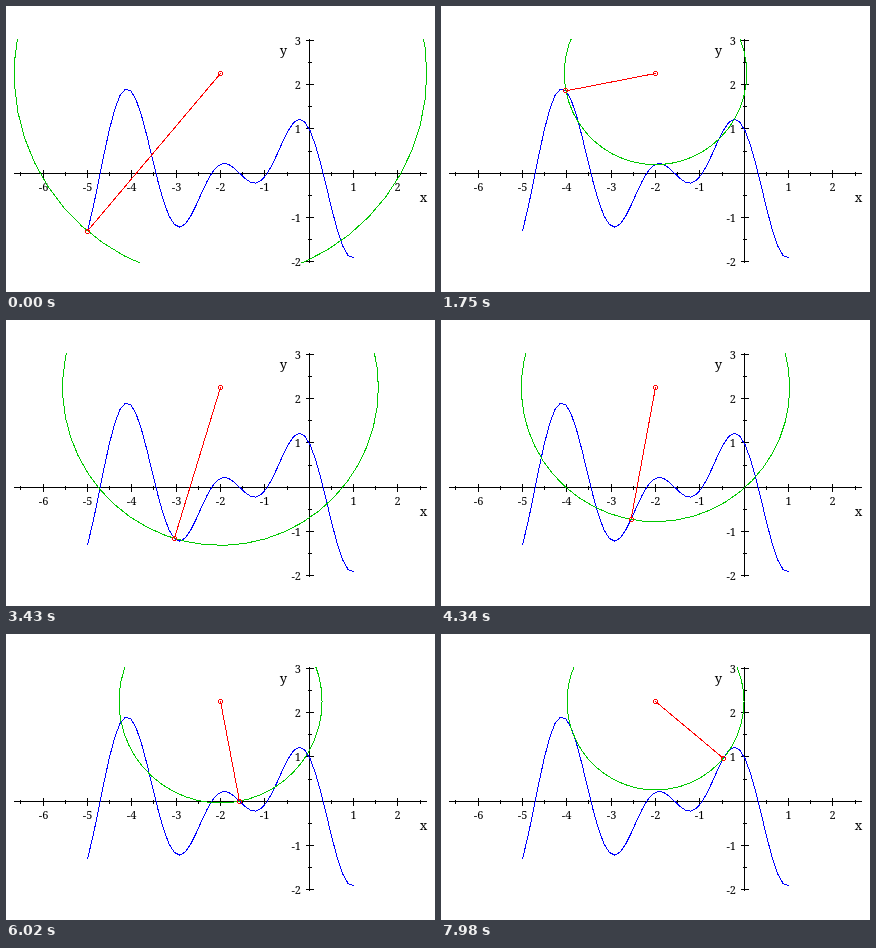
An HTML page that plays this animation: 429x286 px, repeating every 8 s.

```html
<!DOCTYPE html>
<html lang="en">
<head>
<meta charset="utf-8">
<title>Circle through a point moving on a curve</title>
<style>
  html, body { margin: 0; width: 100%; height: 100%; overflow: hidden; background: #fff; }
  svg { display: block; }
  path { fill: none; stroke-width: 1; shape-rendering: crispEdges; }
  text { font: 11px "Noto Serif", "Liberation Serif", serif; fill: #000; }
  .name { font-size: 13px; }
</style>
</head>
<body>
<svg width="429" height="286" viewBox="0 0 429 286">
  <clipPath id="view"><rect x="8" y="33" width="413" height="224"/></clipPath>
  <path id="axes" stroke="#000"/>
  <g id="labels"></g>
  <g clip-path="url(#view)">
    <path id="curve" stroke="#00f"/>
    <path id="ring" stroke="#00c800"/>
    <path id="radius" stroke="#f00"/>
    <path id="hub" stroke="#f00"/>
    <path id="dot" stroke="#f00"/>
  </g>
</svg>
<script>
const el = id => document.getElementById(id);
const px = x => 303.2 + 44.35 * x;
const py = y => 167.25 - 44.35 * y;
const snap = v => Math.floor(v) + 0.5;
const f = x => Math.cos(3 * x) - Math.sin(2 * x);
const center = { x: -2, y: 2.25 };
const STEPS = 49;
const curveX = i => -5 + 6 * i / STEPS;

// Polyline through n + 1 points given by point(i) in plot coordinates
function polyline(id, n, point) {
  const pts = Array.from({ length: n + 1 }, (_, i) => {
    const [x, y] = point(i);
    return px(x).toFixed(2) + ' ' + py(y).toFixed(2);
  });
  el(id).setAttribute('d', 'M' + pts.join('L'));
}

// Small octagonal marker
function marker(id, x, y) {
  el(id).setAttribute('d',
    `M${snap(px(x)) - 1} ${snap(py(y)) - 2}h2l1 1v2l-1 1h-2l-1-1v-2z`);
}

function label(text, x, y, anchor, cls = '') {
  el('labels').innerHTML +=
    `<text x="${x}" y="${y}" text-anchor="${anchor}" class="${cls}">${text}</text>`;
}

function drawAxes() {
  const x0 = snap(px(0)), y0 = snap(py(0));
  let d = `M8 ${y0}H421M${x0} 33V257`;
  for (let v = -6.5; v <= 2.5; v += 0.5) {
    const major = Number.isInteger(v), h = major ? 3.5 : 1.5;
    d += `M${snap(px(v))} ${y0 - h}v${2 * h + 1}`;
    if (major && v) label(v, snap(px(v)), 185, 'middle');
  }
  for (let v = -2; v <= 3; v += 0.5) {
    const major = Number.isInteger(v), w = major ? 3.5 : 1.5;
    d += `M${x0 - w} ${snap(py(v))}h${2 * w + 1}`;
    if (major && v) label(v, 295, snap(py(v)) + 4, 'end');
  }
  el('axes').setAttribute('d', d);
  label('x', 417.5, 196, 'middle', 'name');
  label('y', 277.5, 49, 'middle', 'name');
}

// Steps last 210 ms; the first of every 16 lasts 70 ms longer
function stepAt(t) {
  const block = Math.floor(t / 3430);
  return 16 * block + Math.max(0, Math.floor((t - 3430 * block - 70) / 210));
}

let shown = -1;
function frame() {
  const step = stepAt(performance.now() % 8000);
  if (step !== shown) {
    shown = step;
    const x = curveX(step), y = f(x);
    const r = Math.hypot(x - center.x, y - center.y);
    polyline('ring', STEPS, i => {
      const a = 2 * Math.PI * i / STEPS;
      return [center.x + r * Math.cos(a), center.y + r * Math.sin(a)];
    });
    polyline('radius', 1, i => i ? [x, y] : [center.x, center.y]);
    marker('dot', x, y);
  }
  requestAnimationFrame(frame);
}

drawAxes();
polyline('curve', STEPS, i => [curveX(i), f(curveX(i))]);
marker('hub', center.x, center.y);
frame();
</script>
</body>
</html>
```
